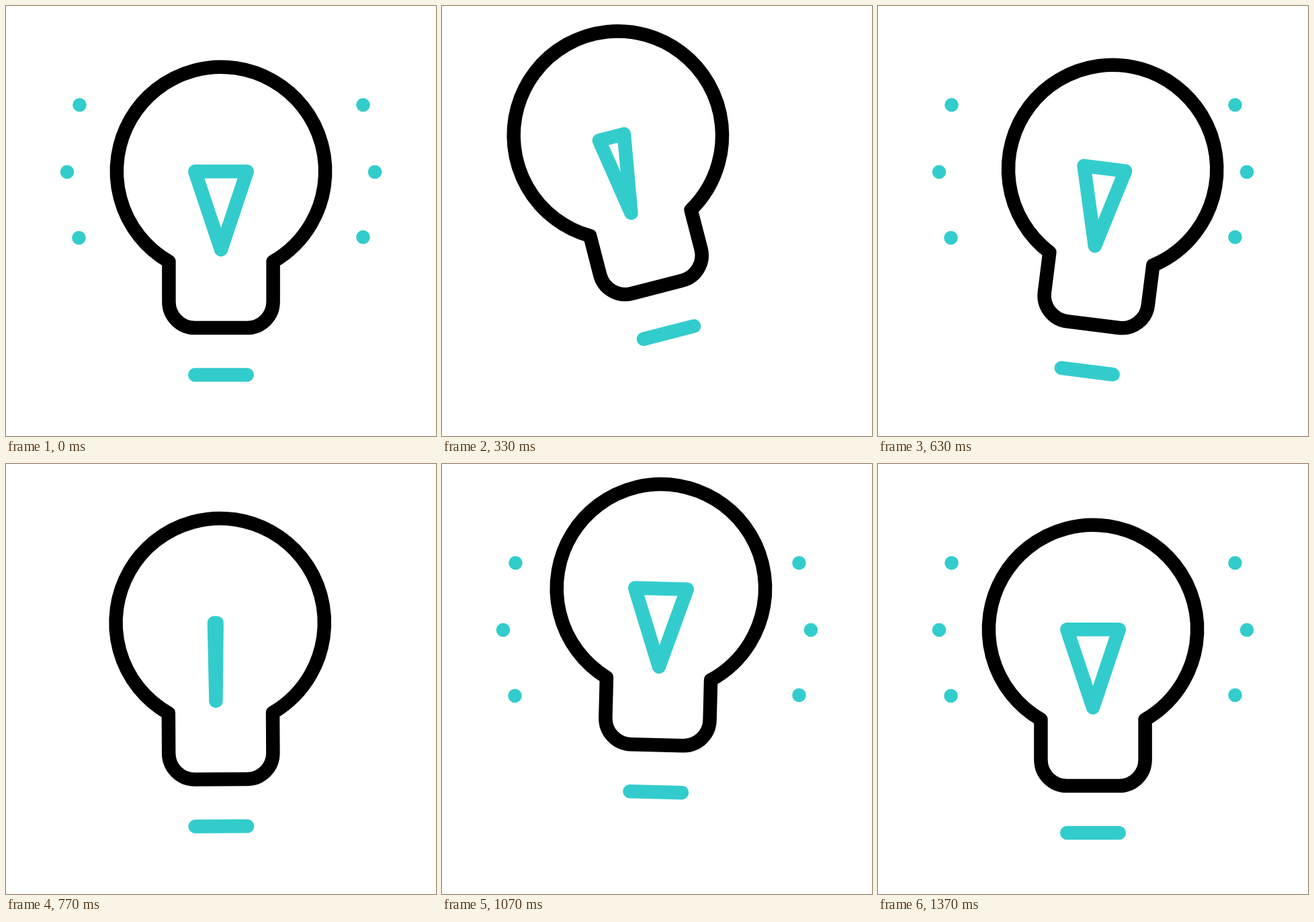
An HTML page with a canvas for the animation above (1.67 s loop, 640 by 640 pixels).

```html
<!DOCTYPE html>
<html lang="en">
<head>
<meta charset="utf-8">
<title>Light bulb</title>
<style>
  html, body { margin: 0; width: 100%; height: 100%; overflow: hidden; background: #fff; }
  canvas { display: block; width: 640px; height: 640px; }
</style>
</head>
<body>
<canvas id="stage" width="640" height="640"></canvas>
<script>
const ctx = document.getElementById('stage').getContext('2d');
const LOOP = 1670;
const TEAL = '#33cccc';
const STROKE = 20.5;
const CENTRE = 320;
const PIVOT_Y = 479;

const smooth = u => u * u * (3 - 2 * u);
const steep = u => u ** 1.89 / (u ** 1.89 + (1 - u) ** 1.89);

// Keys are [step, value] pairs, 30 steps per second.
const TILT = [[0, 0], [11.3, -15], [18.25, 7.5], [25.75, -3.75], [33.3, 1.9], [41, 0]];
const LIFT = [[0, 0], [11.6, -64], [20.5, 0], [30.6, -64], [41, 0]];
const TURN = [[0, 0], [15.5, 1], [31, 0]];
const DARK = [[7.7, 15.4], [23, 30.8]];

const DOTS = [
  [109.5, 147.3], [91, 247], [108.5, 345],
  [531.5, 147.3], [549, 247], [531.5, 344]
];

function valueAt(keys, step, ease) {
  for (let i = 1; i < keys.length; i++) {
    const [t0, v0] = keys[i - 1];
    const [t1, v1] = keys[i];
    if (step < t1) return v0 + (v1 - v0) * ease((step - t0) / (t1 - t0));
  }
  return keys[keys.length - 1][1];
}

function stroke(color, trace) {
  ctx.strokeStyle = color;
  ctx.beginPath();
  trace();
  ctx.stroke();
}

function drawGlass() {
  const radius = 155.2, half = 77.6, corner = 38.8;
  const neck = Math.acos(half / radius);
  stroke('#000', () => {
    ctx.arc(CENTRE, 246, radius, Math.PI - neck, neck);
    ctx.arcTo(CENTRE + half, PIVOT_Y, CENTRE, PIVOT_Y, corner);
    ctx.arcTo(CENTRE - half, PIVOT_Y, CENTRE - half, 400, corner);
    ctx.closePath();
  });
}

function drawFilament(turn) {
  const x = CENTRE - 13 * turn;
  const half = 38.8 * (1 - 1.975 * turn);
  stroke(TEAL, () => {
    ctx.moveTo(x - half, 246.2);
    ctx.lineTo(x + half, 246.2);
    ctx.lineTo(x, 362.6);
    ctx.closePath();
  });
}

function drawBase() {
  stroke(TEAL, () => {
    ctx.moveTo(CENTRE - 38.8, 549);
    ctx.lineTo(CENTRE + 38.8, 549);
  });
}

function drawDots() {
  ctx.fillStyle = TEAL;
  for (const [x, y] of DOTS) {
    ctx.beginPath();
    ctx.arc(x, y, 10.3, 0, 2 * Math.PI);
    ctx.fill();
  }
}

function draw(now) {
  const step = Math.floor((now % LOOP + 4) * 0.03);

  ctx.fillStyle = '#fff';
  ctx.fillRect(0, 0, 640, 640);
  if (!DARK.some(([from, to]) => step >= from && step < to)) drawDots();

  ctx.save();
  ctx.lineWidth = STROKE;
  ctx.lineCap = ctx.lineJoin = 'round';
  ctx.translate(CENTRE, PIVOT_Y + valueAt(LIFT, step, smooth));
  ctx.rotate(valueAt(TILT, step, smooth) * Math.PI / 180);
  ctx.translate(-CENTRE, -PIVOT_Y);
  drawGlass();
  drawFilament(valueAt(TURN, step, steep));
  drawBase();
  ctx.restore();
}

function tick() {
  draw(performance.now());
  requestAnimationFrame(tick);
}
tick();
</script>
</body>
</html>
```
